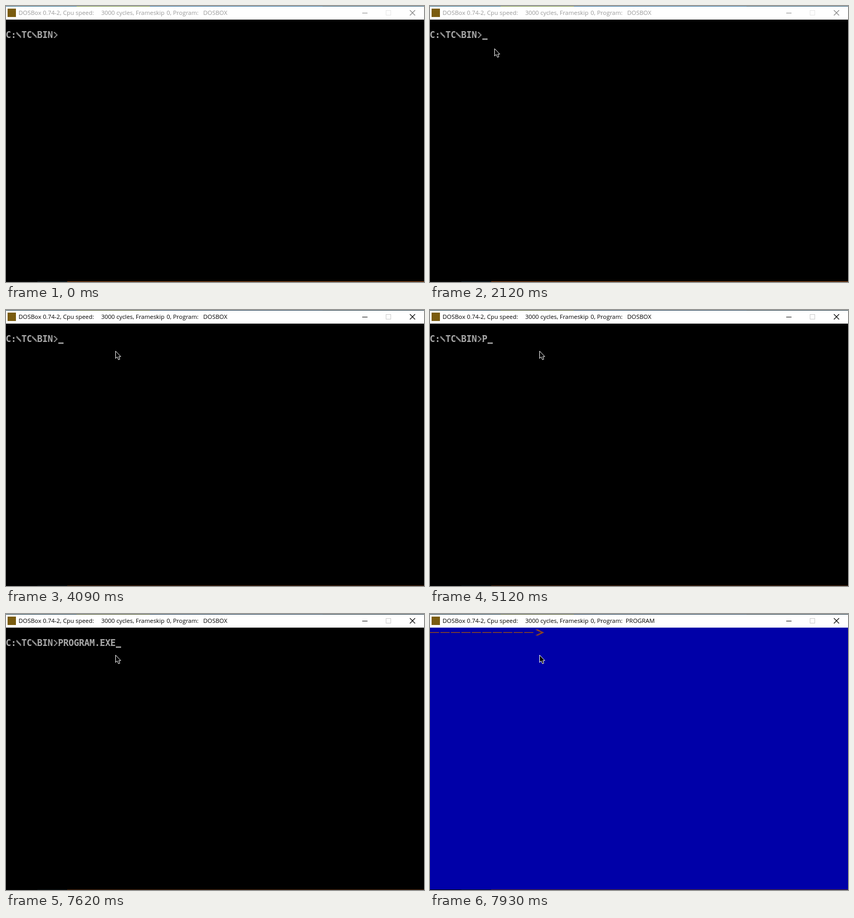
Animation of 799 by 527 pixels, one loop 8 s. Source, as an HTML page with a canvas:

```html
<!DOCTYPE html>
<html lang="en">
<head>
<meta charset="utf-8">
<title>DOSBox</title>
<style>
  html, body { margin: 0; width: 100%; height: 100%; overflow: hidden; background: #000; }
  canvas { display: block; }
</style>
</head>
<body>
<canvas id="stage" width="799" height="527"></canvas>
<script>
const ctx = document.getElementById('stage').getContext('2d');
const W = 799, H = 527, LOOP = 8000;
const FOCUS = 4090, RUN = 7760, SECOND = 7930;
const STEP = 120;            // screen refresh interval
const CW = 10, ROW = 20, TOP = 26;
const GREY = '#a8a8a8', BROWN = '#a85400';
const PROMPT = 'C:\\TC\\BIN>', COMMAND = 'PROGRAM.EXE';

// Runs of cursor flips, one per refresh: [start, flips]
const BLINKS = [
  [120, 3], [640, 6], [1520, 6], [2390, 4], [3060, 8],
  [4210, 1], [4460, 4], [5120, 6], [6000, 8], [7110, 5]
];
// Pointer path: [time, x, y]
const PATH = [[1160, 343, 306], [1520, 96, 18], [1880, 123, 81], [3580, 123, 81], [3940, 209, 78]];

const clamp = (v, lo, hi) => Math.min(hi, Math.max(lo, v));
const stepsSince = (t, start) => Math.floor((t - start) / STEP);

function rect(color, x, y, w, h) {
  ctx.fillStyle = color;
  ctx.fillRect(x, y, w, h);
}

function cursorShown(t) {
  const flips = BLINKS.reduce((sum, [start, n]) => sum + clamp(stepsSince(t, start) + 1, 0, n), 0);
  return flips % 2 === 1;
}

// Two slow keys, then the rest at an even pace
function typedCount(t) {
  if (t < 6000) return (t >= 4870) + (t >= 5750);
  return Math.min(COMMAND.length, 2 + Math.floor(stepsSince(t, 6000) * 1.5));
}

function pointerAt(t) {
  if (t < PATH[0][0]) return null;
  const i = PATH.findLastIndex(p => p[0] <= t);
  const [t0, x0, y0] = PATH[i];
  const [t1, x1, y1] = PATH[Math.min(i + 1, PATH.length - 1)];
  const k = t1 > t0 ? stepsSince(t, t0) * STEP / (t1 - t0) : 0;
  return [Math.round(x0 + (x1 - x0) * k), Math.round(y0 + (y1 - y0) * k)];
}

function glyph(ch, x, y, color, cellW) {
  const sx = cellW / 8, sy = ROW / 16;
  const part = (c, r, w) => rect(color, x + c * sx, y + r * sy, w * sx, sy);
  if (ch === '-') {
    part(0, 7, 7);
  } else if (ch === '>') {
    for (let i = 0; i < 9; i++) part(5 - Math.abs(4 - i), 3 + i, 2);
  } else if (ch === '\\') {
    for (let i = 0; i < 9; i++) {
      const from = Math.max(0, i - 2);
      part(from, 3 + i, Math.min(6, i) - from + 1);
    }
  } else {
    ctx.fillStyle = color;
    ctx.font = 'bold 17px "DejaVu Sans Mono", monospace';
    ctx.textAlign = 'center';
    ctx.fillText(ch, x + 4.5, y + 15);
    // slab feet on the left stem
    if ('BPRE'.includes(ch)) [2, 11].forEach(row => part(0, row, 2));
  }
}

function write(text, x, y, color, cellW = CW) {
  [...text].forEach((ch, i) => glyph(ch, x + i * cellW, y, color, cellW));
}

// One-pixel slice of desktop, dimmer while the window has focus
function strip(y, active, stops) {
  ctx.globalAlpha = active ? 0.48 : 1;
  stops.forEach(([x, color], i) => {
    const end = i + 1 < stops.length ? stops[i + 1][0] : W;
    rect(color, x, y, end - x, 1);
  });
  ctx.globalAlpha = 1;
}

function titleBar(t, active) {
  rect('#fff', 0, 1, W, TOP - 1);
  rect('#7a5c10', 3, 5, 16, 16);

  ctx.fillStyle = active ? '#000' : '#999';
  ctx.font = '11.4px "Open Sans", "Noto Sans", sans-serif';
  ctx.textAlign = 'left';
  const name = t < RUN ? ['DOSBOX', 377] : ['PROGRAM', 374];
  [['DOSBox 0.74-2, Cpu speed:', 24], ['3000 cycles, Frameskip', 182], ['0, Program:', 307], name]
    .forEach(([text, x]) => ctx.fillText(text, x, 17));

  const ink = active ? '#000' : '#858585';
  rect(ink, 681, 13, 10, 1);
  ctx.lineWidth = 1;
  ctx.strokeStyle = active ? '#ccc' : '#e6e6e6';
  ctx.strokeRect(726.5, 8.5, 9, 9);
  ctx.strokeStyle = ink;
  ctx.lineWidth = 1.2;
  ctx.beginPath();
  ctx.moveTo(772, 8);
  ctx.lineTo(782, 18);
  ctx.moveTo(782, 8);
  ctx.lineTo(772, 18);
  ctx.stroke();
}

function shell(t) {
  const line = PROMPT + COMMAND.slice(0, typedCount(t));
  write(line, 0, TOP + ROW, GREY);
  if (cursorShown(t)) rect(GREY, line.length * CW, 62, CW, 2.5);
}

function program(t) {
  const first = t < SECOND;
  rect('#0000a8', 0, TOP, W, H - TOP);
  write('-'.repeat(first ? 4 : 10) + '>', 0, TOP, BROWN, 2 * CW);
  if (first) rect('#00a8a8', 100, TOP, 2 * CW, ROW);
}

function pointer(t) {
  const at = pointerAt(t);
  if (!at) return;
  ctx.save();
  ctx.translate(at[0] + 0.5, at[1] + 0.5);
  const arrow = new Path2D('M0 0V14L3 11L5.5 16.5L8 15.5L6 10.5H10Z');
  ctx.fillStyle = '#000';
  ctx.fill(arrow);
  ctx.strokeStyle = '#fff';
  ctx.lineWidth = 1;
  ctx.stroke(arrow);
  ctx.restore();
}

function draw(t) {
  const active = t >= FOCUS;
  rect('#000', 0, 0, W, H);
  titleBar(t, active);
  (t < RUN ? shell : program)(t);
  rect('#000', 0, H - 1, W, 1);
  strip(0, active, [[0, '#2b6d8c'], [135, '#75903a'], [275, '#2a6c9c'], [605, '#2c5c78']]);
  strip(H - 1, active, [[0, '#101010'], [60, '#26343a'], [117, '#b5622a']]);
  pointer(t);
}

const start = performance.now();
function tick() {
  draw((performance.now() - start) % LOOP);
  requestAnimationFrame(tick);
}
tick();
</script>
</body>
</html>
```
